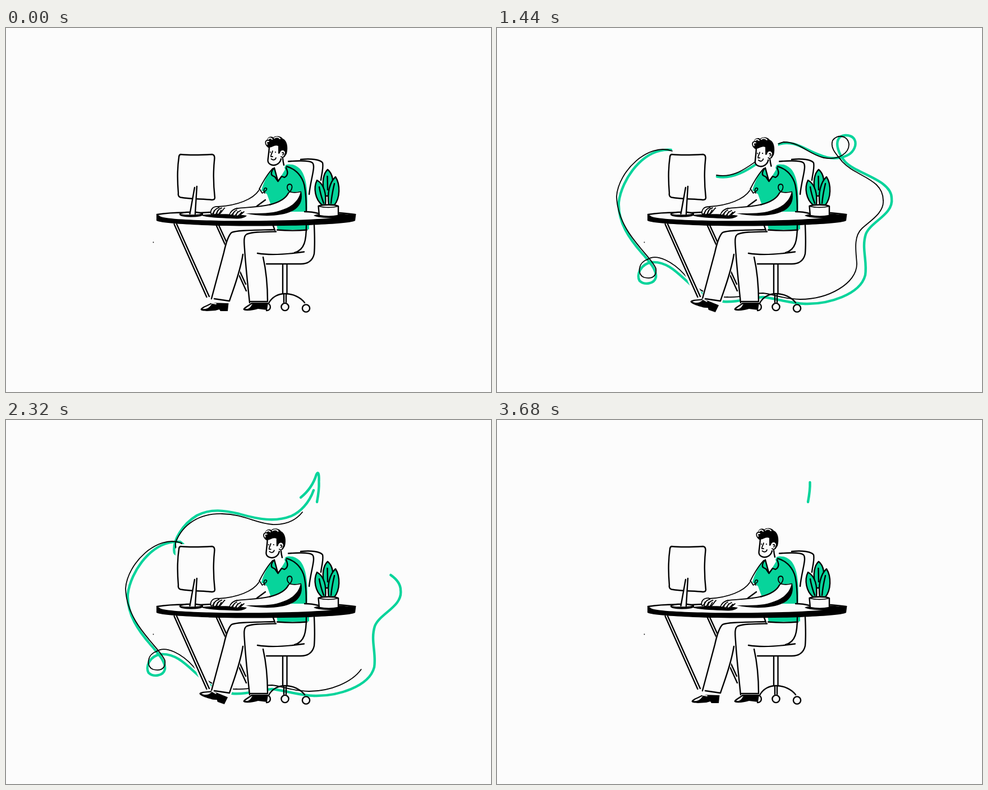
These frames come from a looping animation (864 px wide and 648 px high, 3760 ms). An HTML page:

```html
<!DOCTYPE html>
<html lang="en">
<head>
<meta charset="utf-8">
<title>Desk worker</title>
<style>
html, body { margin: 0; width: 100%; height: 100%; overflow: hidden; background: #fcfcfc; }
svg { display: block; width: 864px; height: 648px; }
path, ellipse, circle { stroke-linecap: round; stroke-linejoin: round; }
.line { fill: none; stroke: #000; stroke-width: 2.4; }
.thin { fill: none; stroke: #000; stroke-width: 1.8; }
.shape { fill: #fcfcfc; stroke: #000; stroke-width: 2.4; }
.paper { fill: #fcfcfc; }
.halo { fill: #fcfcfc; stroke: #fcfcfc; stroke-width: 8; }
.ink { fill: #000; }
.green { fill: #07d49b; }
.leaf { fill: #07d49b; stroke: #000; stroke-width: 2.4; }
.wide { fill: none; stroke: #07d49b; stroke-width: 4.4; }
</style>
</head>
<body>
<svg viewBox="0 0 864 648">
  <g id="ribbon"></g>

  <!-- gaps that keep the ribbon clear of the figure -->
  <path class="halo" d="M468 236L497 208 492 246 470 248Z"/>
  <path class="halo" d="M311 225H368Q372 226 372 232V304L311 301Q306 300 306 294V230Z"/>
  <path class="halo" d="M299 349L357 479H363L305 349Z"/>

  <circle class="ink" cx="262.500" cy="381.500" r=".9"/>

  <!-- chair -->
  <g class="line">
    <path d="M503 237.500C522 236 541 236 546 240C552 246 543 268 540 296"/>
    <path d="M525 234C543 232 560 234 564 240C566 249 562 260 561 271"/>
    <path d="M549 351C550 372 550 390 549 402C546 415 538 420 525 420H464"/>
    <path d="M493 422V473M500.500 422V473M495 475V488M499 475V488"/>
    <path d="M468 490C474 478 486 473 497 473C512 473 525 480 532 489"/>
    <path d="M465 490C473 491 473 503 464 503"/>
  </g>
  <circle class="shape" cx="497" cy="496.500" r="6.600"/>
  <circle class="shape" cx="534.500" cy="499" r="6.600"/>

  <!-- table legs -->
  <path class="line" d="M299.500 349L357.500 479M304 349L362 478M374.500 351L428 468M379 351L427 456"/>

  <!-- trousers -->
  <path class="green" d="M481 344L484 360L540 358.500V344Z"/>
  <path class="halo" d="M410 366C399 368 394 385 388 404L368 482L398 486L422 403L428 366Z"/>
  <path class="line" d="M422 403C417 435 406 462 398 486L371 482"/>
  <path class="line" d="M478 359C440 360 410 360 402 364C396 369 392 382 388 400L366 482"/>
  <path class="halo" d="M431 404L437 487H463L458 408Z"/>
  <path class="paper" d="M481 362C455 363 440 363 429 367C423 370 424 380 425 393L434 489L466 487L458 403C480 404 500 403 515 400C531 394 534 378 534 361Z"/>
  <path class="line" d="M481 362.500C455 363 440 363 429 367C423 370 424 380 425 393C427 425 431 460 434 489M436 487H466C466 455 463 430 458 408"/>
  <path class="line" d="M448 401C470 405 500 403 531 398.500M535 351C535 378 532 395 514 400"/>
  <path class="line" d="M476 352L479 360M483 359.500C502 361 520 361 536 359.500"/>

  <!-- shirt -->
  <path class="green" d="M473 252C464 264 458 277 455 289L465 296L473 318L478 332H536C538 298 537 264 523 250C515 243 505 241 498 244L485 272Z"/>
  <path class="line" d="M500 246.500C517 251 528 265 531.500 280C535 297 535 312 535 328"/>
  <path class="thin" d="M475 250C464 262 457 275 451 287"/>

  <!-- table top -->
  <path class="paper" d="M268 332C300 325 380 328 440 327H536C570 324 605 330 623 332L600 344H290Z"/>
  <path class="ink" d="M268 331V343C276 347 310 349 350 351C400 353 480 353 540 351C580 349 615 347 622 343L623.500 331C612 331 604 332 592 337C540 343 430 344 380 343C340 342 295 341 276 336Z"/>
  <path class="line" d="M269 332C282 330 298 328.500 318 328.500M345 329L364 328M532 327C542 327 549 328 556 330M594 329C606 330 615 331 622 332"/>

  <!-- plant -->
  <path class="ink" d="M548 334C556 329 600 329 615 333C602 340 560 340 548 334Z"/>
  <path class="leaf" d="M568 299C564 284 562 262 573 252C584 261 585 276 577 299Z"/>
  <path class="leaf" d="M563 315C551 305 547 285 554 271C567 278 571 296 569 315Z"/>
  <path class="leaf" d="M575 315C572 295 576 275 587 265C596 279 595 303 585 315Z"/>
  <path class="line" d="M558 283C560 295 563 304 566 312M572.500 264L573 288M585 277C582 290 580 301 579 312"/>
  <path class="shape" d="M556.500 317L558 334C568 336 582 336 592 334V317C584 314 565 314 556.500 317Z"/>
  <path class="thin" d="M558 317.500C566 320 582 320 591 317.500"/>

  <!-- monitor and keyboard -->
  <path class="shape" d="M311 225C330 227 350 226 367 225Q372 226 371.500 232C369 255 369.500 280 372 302Q372 306 367 306C350 304 330 305 311 301.500Q306 300 307 294C305 270 305 250 308 230Q308 226 311 225Z"/>
  <ellipse class="shape" cx="330" cy="331.500" rx="20" ry="3.800"/>
  <path class="ink" d="M309 331C318 333 342 333 351 330C352 338 310 338 309 331Z"/>
  <path class="paper" d="M336 284L327 331H337L340 282Z"/>
  <path class="line" d="M336 284L327.500 331M340 282L337 331"/>
  <path class="ink" d="M346 333C365 331 405 330 429 334C424 340 412 340 400 339C380 338 360 338 346 333Z"/>

  <!-- far arm -->
  <path class="paper" d="M452 288C442 304 412 316 374 319L368 330L395 331L448 318L465 304L463 294Z"/>
  <path class="thin" d="M450.500 289C440 305 412 316 378 318"/>
  <path class="line" d="M462 306L447 317"/>
  <path class="thin" d="M452 287L456.500 294C460 292 465 289 464.500 286C462 282 457 287 461 294"/>
  <g id="fingers" class="thin">
    <path d="M378 318C368 317 364 324 365 330C367 333 370 329 371 325"/>
    <path d="M379 319C371 321 368 328 370 332C373 333 375 328 377 324"/>
    <path d="M384 320C377 322 374 328 376 332C379 332 381 328 383 324"/>
    <path d="M390 321C386 324 385 329 380 332"/>
  </g>

  <!-- near arm -->
  <path class="paper" d="M503 293C498 303 488 309 470 314C450 318 430 319 412 321L398 332L412 335L428 330C460 333 478 331 490 329C512 324 527 312 526 291Z"/>
  <path class="ink" d="M526 291C531 315 515 328 490 332C468 336 445 334 427 330C455 330 473 330 488 325C508 319 521 309 525 291Z"/>
  <path class="line" d="M503 294C498 304 488 310 470 314.500"/>
  <path class="thin" d="M472 314C450 319 430 319 411 321"/>
  <path class="thin" d="M504 293C511 287 511 279 506 278C500 278 499 286 505 291C511 294 519 293 525 291.500"/>
  <path class="thin" d="M413 321C404 322 399 328 398 333C401 336 404 330 407 327M411 324C405 327 403 332 405 335C408 335 411 331 413 327M418 325C411 328 409 332 411 335C415 335 417 331 420 328M424 327L417 333"/>

  <!-- neck and head -->
  <path class="paper" d="M477 242L485 273L498 256L494 240Z"/>
  <g id="head">
    <path class="paper" d="M468 210C467 222 466 230 466 236C467 244 475 246 481 244L497 247L499 213Z"/>
    <path class="line" d="M469 211C468.500 222 467 229 466.500 236C467 243 475 245.500 481 243.500C487 241 489 238 490 233"/>
    <path class="line" d="M493 232C493.500 237 494 240 495 244"/>
    <path class="ink" d="M467 213C460 208 460 200 465 199C466 194 473 192 476 195C481 190 491 193 493 197C501 200 503 213 500 224L496 230L488 223L485 224L485 210C479 207 474 213 467 213Z"/>
    <path d="M465 207C463 203 465 201 468 202M467 198C470 195 473 196 474 198M478 196C482 193 487 195 488 197" fill="none" stroke="#fcfcfc" stroke-width="2"/>
    <path class="paper" d="M488 222C490 215 498 217 497 224C496 231 491 232 489 229Z"/>
    <path class="thin" d="M492 222C495 220 495 225 493 226M497 224C496 231 492 231 490 229"/>
    <path class="thin" d="M475 219C474 223 471 227 472 229L475 229M472.500 233C476 236 480 235 481 231"/>
    <circle class="ink" cx="471" cy="221" r="1.100"/>
    <circle class="ink" cx="480" cy="221" r="1.100"/>
  </g>
  <path class="green" d="M478 249C473 253 471 261 475 263L479 265L484.500 273ZM484.500 273L491 264L496 266C502 263 503 257 499 249Z"/>
  <path class="line" d="M478 249C473 253 471 261 475 263L479 265L484.500 273L491 264L496 266C502 263 503 257 499 249M478 249L484.500 273"/>

  <!-- shoes -->
  <g id="shoe">
    <path class="ink" d="M366 489C358 494 348 496 346.500 501C348 505 362 504 373 503L380 501L382 504H395L396.500 490Z"/>
    <path class="paper" d="M350 500C355 496 362 494 367 491L363 496C359 500 354 501 350 500Z"/>
    <path d="M366 489.500L374 491" fill="none" stroke="#fcfcfc" stroke-width="2"/>
  </g>
  <path class="ink" d="M437 489C431 494 423 497 422.500 501C424 505 440 503 449 500L465 502L467 489Z"/>
  <path class="paper" d="M426 500C431 496 434 494 439 491L436 496C433 500 429 501 426 500Z"/>
</svg>
<script>
const LOOP = 3760, STEP = 40;
const NS = "http://www.w3.org/2000/svg";
const byId = id => document.getElementById(id);
const clamp = v => Math.max(0, Math.min(1, v));

// Strokes listed in drawing order; keys are [time, strokes passed].
const green = {
  cls: "wide",
  strokes: [
    "M392 264.500C420 270 448 252 465 240C478 232 490 212 502 207",
    "M502 207C530 198 550 218 575 226C600 237 632 232 638 210C642 192 622 187 611 194C600 205 610 226 620 238C640 260 703 270 703 303",
    "M703 303C707 332 666 344 657 367C649 392 660 415 656 440C647 475 590 492 549 491",
    "M549 491C520 490 500 482 474 479C450 480 430 489 404 487",
    "M404 487C370 482 355 465 343 455C325 440 305 415 276 417C255 420 248 440 254 450C262 458 280 456 283 444C285 430 270 415 262 405C235 375 215 345 217 310C222 270 260 213 310 217",
    "M310 217C319 222 319 228 312 232C308 241 303 241 300 236C296 215 315 185 340 170C365 157 390 161 415 167C450 177 480 182 508 171C524 164 540 148 548 125",
    "M525 138C540 126 549 110 553 97C556 91 558 95 557.500 109",
    "M557.500 111C558 122 556 135 554 146"
  ],
  draw: [[0, 0], [130, 1], [480, 2], [770, 3], [920, 4], [1440, 5], [1860, 6], [1930, 6], [2040, 7], [2090, 8]],
  erase: [[1940, 0], [2040, 1], [2350, 2], [2640, 3], [2790, 4], [3285, 5], [3610, 6], [3680, 7]]
};
const black = {
  cls: "thin",
  strokes: [
    "M391 262C420 267 440 252 459 239C475 230 490 207 511 203C540 203 555 225 582 231",
    "M582 231C610 236 627 222 627 207C625 190 605 189 598 200C592 215 608 228 615 238C640 265 688 268 688 307",
    "M688 307C690 330 662 345 650 357C634 372 640 400 641 420C641 455 590 483 540 483C510 483 490 473 474 472C450 472 435 481 410 479",
    "M410 479C370 480 350 458 333 438C315 418 285 400 268 412",
    "M268 412C250 418 250 440 262 444C278 448 285 440 283 428C275 405 215 365 213 300C216 255 270 203 312 219",
    "M312 219C318 224 312 242 306 236C302 232 302 225 302 218C315 185 345 166 385 167C425 168 445 184 475 186C500 187 516 179 528 164"
  ],
  draw: [[0, 0], [225, 1], [480, 2], [920, 3], [1085, 4], [1440, 5], [1850, 6]],
  erase: [[1910, 0], [2040, 1], [2180, 2], [2530, 3], [2640, 4], [2800, 5], [2960, 6]]
};
const lean = [[40, 0], [480, 0.45], [920, 0.87], [1440, 1], [2040, 0.87], [2640, 0]];
const tap = [[40, 0], [480, 11], [920, 20], [2880, 20], [3480, 0]];

function at(keys, t) {
  if (t <= keys[0][0]) return keys[0][1];
  for (let i = 1; i < keys.length; i++) {
    const [t0, v0] = keys[i - 1], [t1, v1] = keys[i];
    if (t <= t1) return v0 + (v1 - v0) * (t - t0) / (t1 - t0);
  }
  return keys[keys.length - 1][1];
}

function build(ribbon) {
  ribbon.paths = ribbon.strokes.map(d => {
    const p = document.createElementNS(NS, "path");
    p.setAttribute("d", d);
    p.setAttribute("class", ribbon.cls);
    p.setAttribute("pathLength", 1);
    byId("ribbon").append(p);
    return p;
  });
}

function trim(ribbon, t) {
  const head = at(ribbon.draw, t), tail = at(ribbon.erase, t);
  ribbon.paths.forEach((p, i) => {
    const a = clamp(tail - i), b = clamp(head - i);
    p.style.display = b - a > 0.001 ? "" : "none";
    p.setAttribute("stroke-dasharray", b - a === 1 ? "none" : `${b - a} 2`);
    p.setAttribute("stroke-dashoffset", -a);
  });
}

function render(t) {
  trim(green, t);
  trim(black, t);
  const k = at(lean, t);
  byId("head").setAttribute("transform", `translate(${-6.5 * k} ${2 * k}) rotate(${-k} 490 246)`);
  byId("shoe").setAttribute("transform", `rotate(${at(tap, t)} 386 488)`);
  [...byId("fingers").children].forEach((f, i) => {
    const a = t / LOOP * Math.PI * 16 + i * 1.3;
    f.setAttribute("transform", `translate(${0.6 * Math.sin(a)} ${0.9 * Math.sin(a)})`);
  });
}

build(green);
build(black);
const start = performance.now();
function tick() {
  const t = (performance.now() - start) % LOOP;
  render(Math.floor(t / STEP) * STEP);
  requestAnimationFrame(tick);
}
render(0);
requestAnimationFrame(tick);
</script>
</body>
</html>
```
